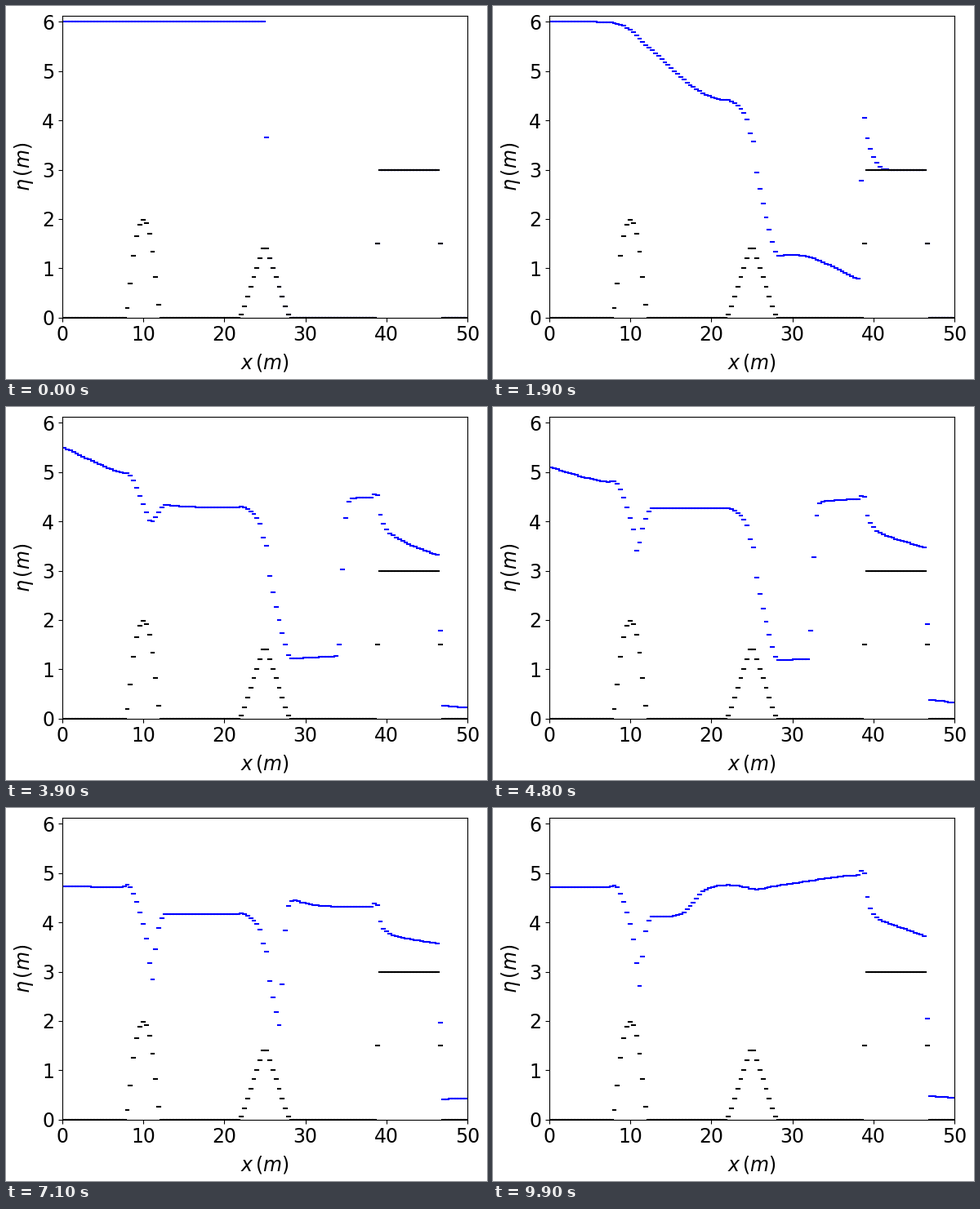
A matplotlib script for the animation above (10 s loop, 589x457 px).

```python
import numpy as np
import matplotlib.pyplot as plt
from matplotlib.animation import FuncAnimation

W, H, DPI = 589, 457, 100
FRAMES, STEP = 100, 0.1            # number of outputs, seconds between them
LENGTH, CELLS = 50.0, 128
G, DRY, CFL = 9.80665, 1e-3, 0.5
MANNING = 0.02

edges = np.linspace(0, LENGTH, CELLS + 1)
dx = LENGTH / CELLS


def bed(x):
    """A parabolic hump, a triangular hump and a block."""
    hump = np.maximum(0, 2 - 0.5 * (x - 10) ** 2)
    ridge = np.maximum(0, 1.5 - 0.5 * np.abs(x - 25))
    block = np.where((x > 39) & (x < 46.5), 3.0, 0.0)
    return hump + ridge + block


def cell_mean(f):
    return 0.5 * (f[:-1] + f[1:])


def speed(h, q):
    wet = h > DRY
    return np.where(wet, q / np.where(wet, h, 1), 0.0)


def hll(hl, ul, hr, ur):
    """HLL fluxes of mass and momentum for a wet or dry interface."""
    al, ar = np.sqrt(G * hl), np.sqrt(G * hr)
    a_mid = np.abs(0.5 * (al + ar) + 0.25 * (ul - ur))
    u_mid = 0.5 * (ul + ur) + al - ar
    sl = np.where(hl <= DRY, ur - 2 * ar, np.minimum(ul - al, u_mid - a_mid))
    sr = np.where(hr <= DRY, ul + 2 * al, np.maximum(ur + ar, u_mid + a_mid))
    gap = np.where(sr - sl > 1e-9, sr - sl, 1.0)
    dry = (hl <= DRY) & (hr <= DRY)

    def pick(fl, fr, wl, wr):
        mid = (sr * fl - sl * fr + sl * sr * (wr - wl)) / gap
        flux = np.where(sl >= 0, fl, np.where(sr >= 0, mid, fr))
        return np.where(dry, 0.0, flux)

    ql, qr = hl * ul, hr * ur
    mass = pick(ql, qr, hl, hr)
    momentum = pick(ql * ul + 0.5 * G * hl ** 2,
                    qr * ur + 0.5 * G * hr ** 2, ql, qr)
    return mass, momentum


def rub(h, q, dt):
    """Bed friction, point-implicit; dry cells come to rest."""
    wet = h > DRY
    depth = np.where(wet, h, 1.0)
    u = speed(h, q)
    drag = G * MANNING ** 2 / np.cbrt(depth) * np.abs(u)
    return np.where(wet, q - dt * drag * u / (1 + 2 * dt * drag / depth), 0.0)


def advance(h, q, z, dt):
    """One well-balanced first-order step with open ends."""
    hp, qp, zp = (np.pad(a, 1, mode="edge") for a in (h, q, z))
    eta, u = hp + zp, speed(hp, qp)
    top = np.maximum(zp[:-1], zp[1:])
    hl = np.maximum(0, eta[:-1] - top)
    hr = np.maximum(0, eta[1:] - top)
    zl, zr = np.minimum(top, eta[:-1]), np.minimum(top, eta[1:])
    mass, momentum = hll(hl, u[:-1], hr, u[1:])
    slope = 0.5 * G * (hl[1:] + hr[:-1]) * (zl[1:] - zr[:-1])
    h = np.maximum(0, h - dt / dx * np.diff(mass))
    q = q - dt / dx * (np.diff(momentum) + slope)
    return h, rub(h, q, dt)


def simulate():
    """Water surface at every output time."""
    z_edge = bed(edges)
    z = cell_mean(z_edge)
    h = cell_mean(np.where(edges <= 25, 6.0, z_edge)) - z
    q = np.zeros(CELLS)
    levels, t = [h + z], 0.0
    for k in range(1, FRAMES):
        while t < k * STEP - 1e-9:
            fastest = np.max(np.abs(speed(h, q)) + np.sqrt(G * h))
            dt = min(CFL * dx / fastest, k * STEP - t)
            h, q = advance(h, q, z, dt)
            t += dt
        levels.append(h + z)
    return z, levels


def bars(v):
    """Heights for one separate dash per cell."""
    return np.column_stack([v, v, np.full(CELLS, np.nan)]).ravel()


plt.rcParams.update({"font.family": "DejaVu Sans", "font.size": 17,
                     "axes.labelpad": 6, "path.simplify": False})

z, levels = simulate()
xs = np.column_stack([edges[:-1], edges[1:], np.full(CELLS, np.nan)]).ravel()

fig = plt.figure(figsize=(W / DPI, H / DPI), dpi=DPI, facecolor="white")
ax = fig.add_axes([69 / W, 75.3 / H, 496 / W, 369.6 / H])
ax.set(xlim=(0, LENGTH), ylim=(0, 6.12),
       xticks=range(0, 51, 10), yticks=range(7))
ax.set_xlabel(r"$x\,(m)$")
ax.set_ylabel(r"$\eta\,(m)$")
surface, = ax.plot(xs, bars(levels[0]), color="b", lw=1.5)
ax.plot(xs, bars(z), color="k", lw=1.5)


def draw(k):
    surface.set_ydata(bars(levels[k]))
    return surface,


anim = FuncAnimation(fig, draw, frames=FRAMES, interval=100,
                     repeat=True, repeat_delay=0)
plt.show()
```
